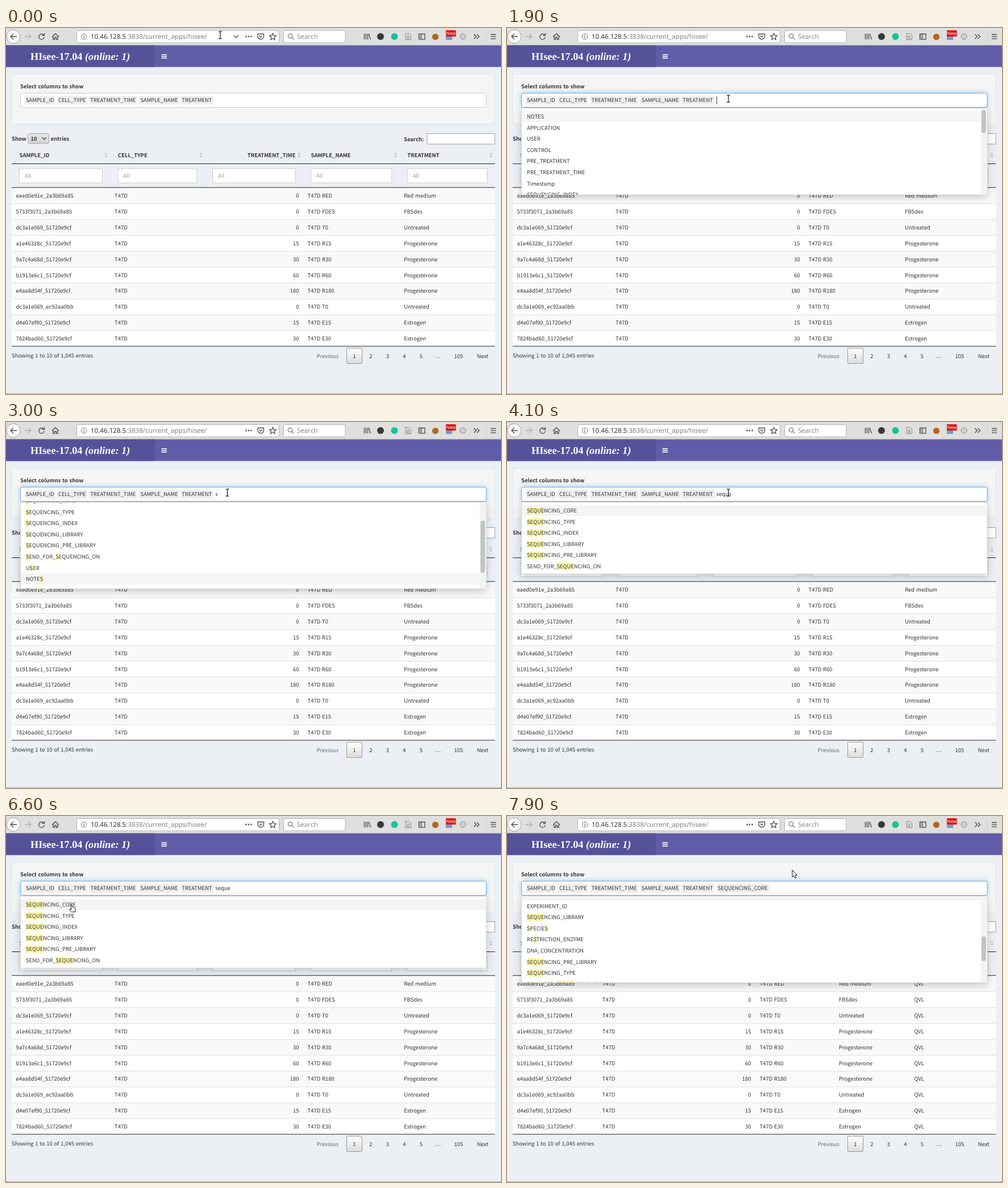
An HTML page for the animation above (8 s loop, 871 by 643 pixels).

```html
<!DOCTYPE html>
<html lang="en">
<head>
<meta charset="utf-8">
<title>Column picker</title>
<style>
  html, body { margin: 0; width: 100%; height: 100%; overflow: hidden; background: #ecf0f5; }
  svg { display: block; text-rendering: geometricPrecision; }
  text { font: 9.47px "Noto Sans CJK JP", "Noto Sans CJK SC", "Noto Sans", sans-serif; fill: #333; white-space: pre; word-spacing: .7px; }
  .b { font-weight: 700; }
  .item { font-size: 9.33px; }
  .ui { font: 11.57px "Noto Sans", sans-serif; }
  .title { font: bold 18.2px "Liberation Serif", serif; fill: #fff; word-spacing: 0; }
  .hint { fill: #999; }
  .glow { filter: drop-shadow(0 0 5px rgba(102,175,233,.6)); }
  .menu { filter: drop-shadow(0 4.5px 7px rgba(0,0,0,.2)); }
  .ico { fill: none; stroke: #4a4a4a; stroke-width: 1.3; }
</style>
</head>
<body>
<svg id="stage" width="871" height="643" viewBox="0 0 871 643">
  <defs>
    <linearGradient id="btn" x2="0" y2="1"><stop stop-color="#fff"/><stop offset="1" stop-color="#dcdcdc"/></linearGradient>
    <linearGradient id="sel" x2="0" y2="1"><stop stop-color="#e6e6e6"/><stop offset="1" stop-color="#d2d2d2"/></linearGradient>
    <clipPath id="clip"><rect x="25" y="141.5" width="820" height="151"/></clipPath>
  </defs>
</svg>
<script>
const stage = document.getElementById('stage');
const ROW = 27.89, ITEM = 19.62;

const ctx = document.createElement('canvas').getContext('2d');
ctx.font = '9.33px "Noto Sans CJK JP", "Noto Sans CJK SC", "Noto Sans", sans-serif';
const width = s => ctx.measureText(s).width;

const text = (x, y, s, attrs = '') => `<text x="${x}" y="${y}" ${attrs}>${s}</text>`;
const rect = (x, y, w, h, fill, attrs = '') =>
  `<rect x="${x}" y="${y}" width="${w}" height="${h}" fill="${fill}" ${attrs}/>`;
const icon = (d, attrs = '') => `<path class="ico" d="${d}" ${attrs}/>`;
const dot = (x, y, r, fill, attrs = '') => `<circle cx="${x}" cy="${y}" r="${r}" fill="${fill}" ${attrs}/>`;
const group = (id, body, attrs = '') => `<g id="${id}" ${attrs}>${body}</g>`;
const END = 'text-anchor="end"', MID = 'text-anchor="middle"';

function toolbar() {
  const field = 'stroke="#b4b4b4" rx="2"';
  return rect(0, 0, 871, 30.5, '#dfdfde') + rect(0, 29.5, 871, 1, '#c4c4c7') +
    dot(13, 15, 12, '#fafafa', 'stroke="#a0a0a0"') +
    icon('M19 15H8M13 10L8 15L13 20', 'stroke-width="1.7"') +
    icon('M33 15H44M39 10L44 15L39 20', 'style="stroke:#b0b0b0"') +
    icon('M66.2 12.2A4.8 4.8 0 1 0 67.3 16M67.5 9V13H63.5', 'stroke-width="1.6"') +
    icon('M81 15.5L87 10L93 15.5M83 14.5V20H85.6V16.5H88.4V20H91V14.5') +
    rect(124.5, 4.5, 356, 21.5, '#fff', field) +
    dot(137, 15, 4.8, 'none', 'stroke="#777"') + rect(136.4, 14, 1.3, 4, '#777') + rect(136.4, 11.8, 1.3, 1.3, '#777') +
    text(149, 19.3, '10.46.128.5<tspan fill="#808080">:3838/current_apps/hisee/</tspan>', 'class="ui"') +
    icon('M401 13L405 17L409 13', 'id="chevron"') +
    [422.5, 427, 431.5].map(x => dot(x, 15, 1.4, '#555')).join('') +
    icon('M443 10.5H453.5V14.5A5.2 5.2 0 0 1 443 14.5ZM445.7 13.4L448.2 16L450.8 13.4') +
    icon('M469.5 9.3L471.2 13.2L475.3 13.6L472.2 16.4L473.1 20.5L469.5 18.3L465.9 20.5L466.8 16.4L463.7 13.6L467.8 13.2Z') +
    rect(488.5, 4.5, 108.5, 21.5, '#fff', field) +
    icon('M502.7 16.6L506.4 20.3', 'style="stroke:#777"') + dot(500, 14, 3.7, 'none', 'stroke="#777" stroke-width="1.3"') +
    text(512, 19.3, 'Search', 'class="ui" style="fill:#8a8a8a"') +
    icon('M630.5 10V20M633.5 10V20M636.5 10V20M638.3 10.3L641.5 20') +
    dot(659, 15, 6, '#383838') + dot(683.5, 15, 6, '#16c39a') +
    icon('M703 9.5H709.5L712.5 12.5V20.5H703ZM705 14H710M705 16.3H710M705 18.5H710', 'style="stroke:#888;stroke-width:1"') +
    icon('M726.5 10.5H737V19.8H726.5ZM731 10.5V19.8') + rect(727, 11, 3.5, 8.5, '#aaa') +
    dot(755.5, 15.5, 5.6, '#b4661f') +
    rect(774, 11, 11, 10, '#6b9fd0') + rect(774, 4, 17.5, 11, '#e01010') +
    text(782.8, 12.2, 'New', MID + ' style="font:7.6px \'Noto Sans\',sans-serif;fill:#fff"') +
    dot(804, 15, 5, '#d0d0d0', 'stroke="#888"') +
    icon('M823.5 11L827.5 15L823.5 19M828.5 11L832.5 15L828.5 19') +
    rect(845, 5, 1, 20, '#cecece') +
    icon('M853 11.5H862M853 15.2H862M853 18.9H862', 'stroke-width="1.4"');
}

function header() {
  return rect(0, 30.5, 871, 38, '#605ca8') + rect(0, 30.5, 262, 38, '#555299') +
    text(43, 56.4, 'HIsee-17.04 <tspan font-style="italic">(online: 1)</tspan>', 'class="title"') +
    [46, 49, 52].map(y => rect(273.5, y, 9.5, 1.6, '#fff')).join('');
}

function controls() {
  const pages = [[642, 2], [671.5, 3], [701, 4], [730.3, 5], [796.5, 105], [838.8, 'Next']];
  return rect(10, 81, 850, 88, '#f5f5f5', 'stroke="#e3e3e3" rx="3"') +
    text(25, 106, 'Select columns to show', 'class="b"') +
    text(10, 197.7, 'Show', 'class="b"') + text(78.5, 197.7, 'entries', 'class="b"') +
    rect(39, 185.5, 36.5, 17.5, 'url(#sel)', 'stroke="#a6a6a6" rx="2.5"') +
    text(43.5, 197.7, '10', 'class="b"') + icon('M63.8 192.3L67.3 195.8L70.8 192.3', 'stroke-width="1.5"') +
    text(700, 198.5, 'Search:', 'class="b"') + rect(741, 185.5, 119, 18.5, '#fff', 'stroke="#9c9c9c"') +
    text(10, 579.3, 'Showing 1 to 10 of 1,045 entries') +
    text(546.7, 579.5, 'Previous', 'style="fill:#666"') +
    rect(599.5, 562.5, 27, 27, 'url(#btn)', 'stroke="#979797" rx="1.5"') + text(613, 579.5, '1', MID) +
    pages.map(([x, s]) => text(x, 579.5, s, MID)).join('') +
    [756.5, 760, 763.5].map(x => dot(x, 579, 0.7, '#444')).join('') +
    rect(0, 641.6, 871, 1.4, '#c3c5c8');
}

const HEADS = ['SAMPLE_ID', 'CELL_TYPE', 'TREATMENT_TIME', 'SAMPLE_NAME', 'TREATMENT', 'SEQUENCING_CORE'];
const ROWS = `eaed0e91e_2a3b69a85 0 RED Red medium
5733f3071_2a3b69a85 0 FDES FBSdes
dc3a1e069_51720e9cf 0 T0 Untreated
a1e46328c_51720e9cf 15 R15 Progesterone
9a7c4a68d_51720e9cf 30 R30 Progesterone
b1913e6c1_51720e9cf 60 R60 Progesterone
e4aa8d54f_51720e9cf 180 R180 Progesterone
dc3a1e069_ec92aa0bb 0 T0 Untreated
d4e07ef90_51720e9cf 15 E15 Estrogen
7824bad60_51720e9cf 30 E30 Estrogen`.split('\n').map(line => {
  const [id, time, name, ...treat] = line.split(' ');
  return [id, 'T47D', time, 'T47D ' + name, treat.join(' '), 'QVL'];
});

// edges: left border of every column, then the right border of the last one
function table(edges) {
  const cols = edges.slice(0, -1).map((l, i) => [l, edges[i + 1]]);
  const cell = (i, pad, y, s, attrs = '') => i === 2
    ? text(cols[i][1] - pad, y, s, attrs + ' ' + END) : text(cols[i][0] + pad, y, s, attrs);
  let out = '';
  cols.forEach(([l, r], i) => {
    out += cell(i, 13.5, 227.2, HEADS[i], 'class="b"') +
      `<path d="M${r - 10} 222.7L${r - 7.2} 218.5L${r - 4.4} 222.7ZM${r - 10} 224.3L${r - 7.2} 228.5L${r - 4.4} 224.3Z" fill="#c9ccd1"/>` +
      rect(l + 13.5, 247, r - l - 27.5, 25, '#fff', 'stroke="#ccc"') +
      text(l + 23, 263, 'All', 'class="hint"');
  });
  ROWS.forEach((row, n) => {
    const y = 280.4 + n * ROW;
    out += rect(10, y, 850.5, ROW, n % 2 ? '#fff' : '#f9f9f9') + (n ? rect(10, y, 850.5, 0.9, '#ddd') : '');
    cols.forEach((_, i) => { out += cell(i, 7.5, (y + 17.7).toFixed(2), row[i]); });
  });
  return out + rect(10, 238, 850.5, 1, '#222') + rect(10, 279.7, 850.5, 1, '#222') + rect(10, 558.6, 850.5, 1, '#222');
}

const tag = (x, s) => rect(x - 2.5, 119, width(s) + 5, 15.6, '#efefef', 'rx="2"') + text(x, 130.4, s, 'class="item"');
const TAG_X = [35, 92, 148.5, 236.5, 309.2];

function picker() {
  const box = (fill, attrs) => rect(25.5, 114.5, 819.5, 25, fill, 'rx="3" ' + attrs);
  return box('#fff', 'stroke="#ccc"') + group('focus', box('#fff', 'stroke="#66afe9" class="glow"')) +
    TAG_X.map((x, i) => tag(x, HEADS[i])).join('') + group('newTag', tag(370.7, HEADS[5])) +
    text(368.3, 130.4, '', 'id="typed"') + rect(0, 120, 1, 13.5, '#222', 'id="caret"');
}

// thumb: top and height of the scroll bar's handle
function menu(id, { items, query, active, thumb }) {
  const right = thumb ? 833.5 : 845;
  const bottom = thumb ? 293 : 267;
  let list = rect(26, 145.7 + active * ITEM, right - 26, ITEM, '#f5f5f5');
  items.split(' ').forEach((s, i) => {
    const y = 155.5 + i * ITEM;
    if (query) for (const m of s.matchAll(query))
      list += rect(35 + width(s.slice(0, m.index)), y - 6.5, width(m[0]), 13, 'rgba(255,237,40,.4)');
    list += text(35, y + 3.5, s, 'class="item"');
  });
  const bar = thumb ? rect(833.5, 141.5, 11, 151, '#f3f3f3') + group(id + 'Thumb',
    rect(835.8, 0, 6.2, thumb[1], '#c4c4c4', 'stroke="#a8a8a8" stroke-width=".8" rx="2.5"'),
    `transform="translate(0 ${thumb[0]})"`) : '';
  return group(id, rect(25.5, 141, 819.5, bottom - 141, '#fff', 'stroke="#d0d0d0" stroke-width=".8" class="menu"') +
    `<g clip-path="url(#clip)">${group(id + 'List', list)}${bar}</g>`);
}

const SEQ = 'SEQUENCING_CORE SEQUENCING_TYPE SEQUENCING_INDEX SEQUENCING_LIBRARY SEQUENCING_PRE_LIBRARY SEND_FOR_SEQUENCING_ON';
const MENUS = {
  all: { active: 0, thumb: [145, 39],
    items: 'NOTES APPLICATION USER CONTROL PRE_TREATMENT PRE_TREATMENT_TIME Timestamp SEQUENCING_INDEX' },
  letter: { active: 8, thumb: [174, 90], query: /s/gi, items: `SPECIES ${SEQ} USER NOTES Timestamp` },
  word: { active: 0, query: /seque/gi, items: SEQ },
  rest: { active: -1, thumb: [212, 42], query: /seque|s(?!e)/gi,
    items: 'EXPERIMENT_ID SEQUENCING_LIBRARY SPECIES RESTRICTION_ENZYME DNA_CONCENTRATION SEQUENCING_PRE_LIBRARY SEQUENCING_TYPE SEND_FOR_SEQUENCING_ON' }
};

// every pointer has its hot spot at 0,0
const BEAM = 'd="M-2.8 -6.2H-.8L0 -5.6L.8 -6.2H2.8M0 -5.6V5.6M-2.8 6.2H-.8L0 5.6L.8 6.2H2.8" fill="none"';
const POINTERS = {
  beam: `<path ${BEAM} stroke="#fff" stroke-width="2.4"/><path ${BEAM} stroke="#111" stroke-width="1.2"/>`,
  arrow: '<path d="M0 0V12.2L2.8 9.7L4.9 14.2L7 13.2L5 8.9H8.6Z" fill="#fff" stroke="#111" stroke-linejoin="round"/>',
  hand: '<path d="M-.9 1.2Q0 -.4 1.3 1.1L2.3 4.6Q3.6 3.8 4.3 5Q5.5 4.5 6 5.7Q7.3 5.8 7.2 7.4L6.4 12.6H.3L-3.3 8.9Q-3.6 7.2 -1.9 7.5L.2 8.4Z" fill="#fff" stroke="#111" stroke-linejoin="round"/>'
};

stage.insertAdjacentHTML('beforeend',
  toolbar() + header() + controls() +
  group('before', table([10, 183.5, 350, 523, 692.7, 860.5])) +
  group('after', table([10, 160, 300, 437, 576.5, 709, 860.5])) +
  picker() +
  Object.entries(MENUS).map(([id, m]) => menu(id, m)).join('') +
  group('pointer', Object.entries(POINTERS).map(([id, p]) => group(id, p)).join('')));

const el = id => document.getElementById(id);
const show = (id, on) => el(id).setAttribute('display', on ? 'inline' : 'none');
const shift = (id, x, y) => el(id).setAttribute('transform', `translate(${x} ${y})`);

// start, steps of 100 ms, end point, optional bend of the path
const MOVES = [
  [400, 7, 389.5, 124, -22, -8],
  [5000, 1, 386.8, 124],
  [5300, 4, 165, 137.5],
  [5800, 3, 119.8, 152.5],
  [6300, 1, 115, 156],
  [7200, 1, 150, 146.5],
  [7800, 2, 502, 95]
];

function pointerAt(t) {
  let x = 377, y = 12.5;
  for (const [start, steps, x2, y2, bx = 0, by = 0] of MOVES) {
    if (t < start) break;
    const k = Math.min(1, (Math.floor((t - start) / 100) + 1) / steps);
    const e = k * k * (3 - 2 * k), bend = 2 * e * (1 - e);
    x += (x2 - x) * e + bx * bend;
    y += (y2 - y) * e + by * bend;
  }
  return [x, y];
}

function draw(t) {
  const open = t < 1900 ? '' : t < 2900 ? 'all' : t < 4100 ? 'letter' : t < 7200 ? 'word' : 'rest';
  const done = open === 'rest';
  for (const id in MENUS) show(id, id === open);
  const scroll = t < 3000 ? 0.5 : 1;
  shift('letterList', 0, -36.7 * scroll);
  shift('letterThumb', 0, 143 + 31 * scroll);
  shift('restList', 0, 2.5);

  show('before', !done);
  show('after', done);
  show('newTag', done);
  show('focus', open);
  show('chevron', t < 500);

  const typed = { letter: 's', word: 'seque' }[open] || '';
  el('typed').textContent = typed;
  el('caret').setAttribute('x', typed ? 395 : 368.5);
  show('caret', open === 'all' || (t >= 5300 && t < 6600));

  const [x, y] = pointerAt(t);
  const kind = y > 142 ? 'hand' : y > 30 && y < 114 ? 'arrow' : 'beam';
  for (const id in POINTERS) show(id, id === kind);
  shift('pointer', x.toFixed(2), y.toFixed(2));
}

const begin = performance.now();
function tick() {
  draw((performance.now() - begin) % 8000);
  requestAnimationFrame(tick);
}
tick();
</script>
</body>
</html>
```
